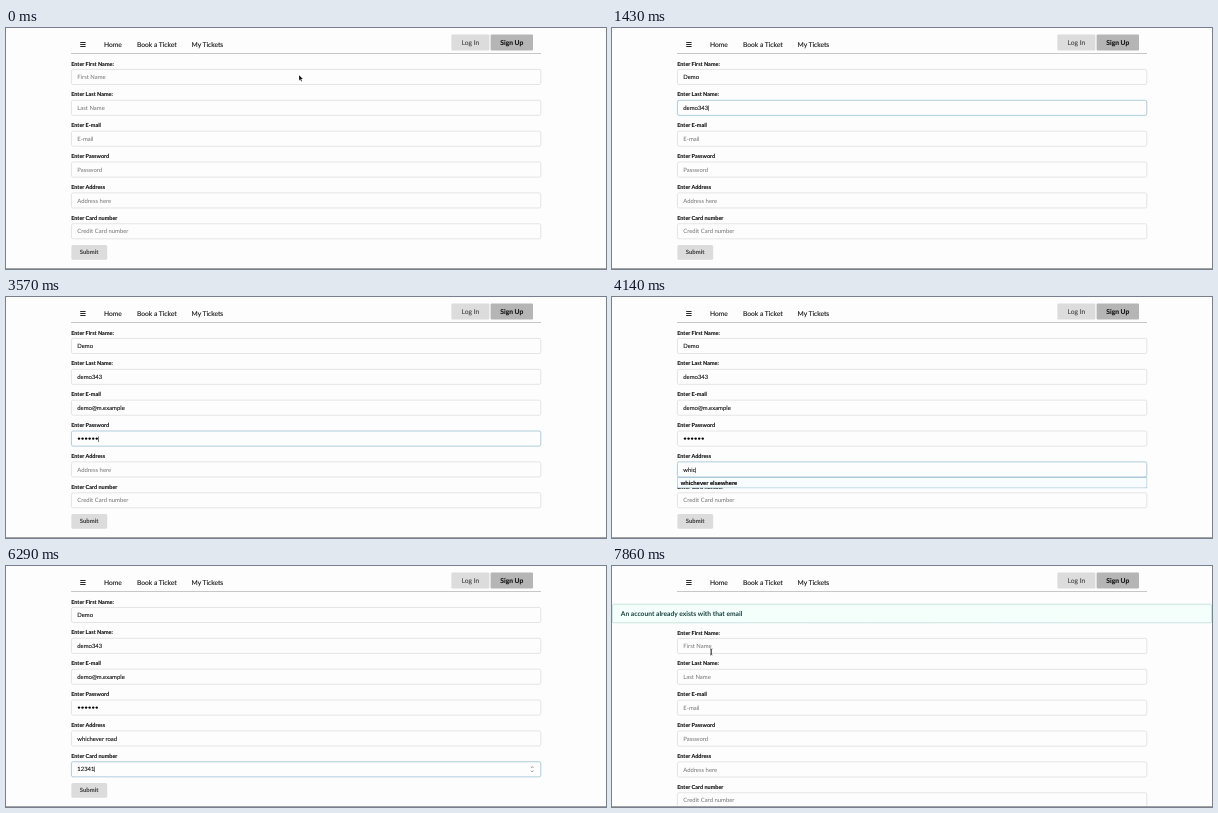
Animation, 600 px wide and 241 px high, one loop 8 s. Source, as an HTML page:

```html
<!DOCTYPE html>
<html lang="en">
<head>
<meta charset="utf-8">
<title>Sign-up form</title>
<style>
  html, body { margin: 0; height: 100%; overflow: hidden; background: #fdfdfd; }
  svg { display: block; width: 600px; height: 241px; }
  text { font: 5.92px Lato, sans-serif; fill: #111; stroke: #111; stroke-width: .1px; text-rendering: geometricPrecision; white-space: pre; }
  .nav { font-size: 6.7px; }
  .label { font-size: 5.5px; font-weight: 700; }
  .bold { font-weight: 700; }
  .hint { fill: #737373; stroke: none; }
  .muted { fill: #444; stroke: #444; }
  .option { font: 700 5.65px "Liberation Sans", sans-serif; fill: #000; }
  .banner { font-size: 6.69px; font-weight: 700; fill: #17403f; stroke: none; }
  .box { fill: #fdfdfd; stroke: #dadada; stroke-width: .7; }
  .focus { stroke: #8fb9cf; }
</style>
</head>
<body>
<svg id="stage" viewBox="0 0 600 241"></svg>
<script>
const LOOP = 8000, TICK = 1000 / 7;
const BLUR = 51, BLANK = 52, RELOADED = 53, MOVED = 55;

// keys: number of typed characters at each tick, counted from start
const fields = [
  { label: 'Enter First Name:', hint: 'First Name', start: 1, value: 'Demo',
    keys: [0, 1, 2, 3, 4], options: ['Demo'] },
  { label: 'Enter Last Name:', hint: 'Last Name', start: 6, value: 'demo343',
    keys: [0, 2, 4, 6, 7], options: ['demo'] },
  { label: 'Enter E-mail', hint: 'E-mail', start: 11, value: 'demo@m.example',
    keys: [0, 1, 2, 4, 4, 5, 7, 12, 14], options: ['demo@m.example', 'demo343@m.example'] },
  { label: 'Enter Password', hint: 'Password', start: 20, secret: true, value: '......',
    keys: [0, 1, 2, 3, 5, 6], options: [] },
  { label: 'Enter Address', hint: 'Address here', start: 27, value: 'whichever road 358',
    keys: [0, 2, 4, 8, 13, 13, 14, 16, 17, 18, 17, 18, 16, 14], options: ['whichever elsewhere'] },
  { label: 'Enter Card number', hint: 'Credit Card number', start: 41, numeric: true, value: '123412341234',
    keys: [0, 1, 3, 5, 7, 9, 11, 12], options: [] }
];

const text = (x, y, str, cls = '', extra = '') => `<text x="${x}" y="${y}" class="${cls}" ${extra}>${str}</text>`;
const rect = (x, y, w, h, fill, rx = 0) => `<rect x="${x}" y="${y}" width="${w}" height="${h}" rx="${rx}" fill="${fill}"/>`;
const box = (y, h, focus, rx) => `<rect x="65.4" y="${y}" width="469.4" height="${h}" rx="${rx}" class="box ${focus ? 'focus' : ''}"/>`;
const centered = 'text-anchor="middle"';

function header() {
  const bars = [14, 16, 18].map(y => rect(74.2, y, 5.4, .9, '#111')).join('');
  return bars + text(98, 18.7, 'Home', 'nav') + text(131, 18.7, 'Book a Ticket', 'nav') +
    text(185.6, 18.7, 'My Tickets', 'nav') +
    rect(445.4, 6.6, 38, 16, '#dcdcdc', 1) + text(464.4, 17.1, 'Log In', 'nav muted', centered) +
    rect(484.6, 6.6, 42.4, 16, '#b5b5b5', 1) + text(505.8, 17.1, 'Sign Up', 'nav bold', centered) +
    rect(65, 25, 470, .8, '#bbb');
}

function field(f, i, tick, shift) {
  const y = 41.4 + i * 30.87 + shift;
  const next = fields[i + 1];
  const focus = tick >= f.start && tick < (next ? next.start : BLUR);
  const started = tick >= f.start && tick < RELOADED;
  const typed = started ? f.value.slice(0, f.keys[Math.min(tick - f.start, f.keys.length - 1)]) : '';
  const caret = focus ? '<tspan dx="-.6">|</tspan>' : '';
  let out = text(65.2, y - 3.8, f.label, 'label') + box(y, 15.1, focus, 1.7);

  if (!typed) out += text(71.3, y + 9.7, f.hint, 'hint');
  if (f.secret) {
    for (let n = 0; n < typed.length; n++) out += `<circle cx="${73 + n * 3.55}" cy="${y + 7.6}" r="1.2"/>`;
    out += text(71.3 + typed.length * 3.55, y + 9.7, caret);
  } else {
    out += text(71.3, y + 9.7, typed + caret);
  }
  if (f.numeric && focus) {
    out += `<path d="M525 ${y + 6.2}l1.2-1.5 1.2 1.5M525 ${y + 8.8}l1.2 1.5 1.2-1.5" fill="none" stroke="#777" stroke-width=".7"/>`;
  }
  return { out, menu: focus && typed ? menu(f.options.filter(o => o.startsWith(typed)), y + 15.4) : '' };
}

function menu(options, y) {
  if (!options.length) return '';
  return box(y + .4, options.length * 10.1, true, 0) + rect(65.8, y + .8, 468.6, 9.3, '#f8fcfe') +
    options.map((o, i) => text(68.8, y + 8 + i * 10.1, o, 'option')).join('');
}

const arrow = (x, y) =>
  `<path d="M${x} ${y}v5.6l1.3-1.2.9 2 .9-.4-.9-2h1.8z" fill="#000" stroke="#fff" stroke-width=".3"/>`;
const beam = (x, y) =>
  `<path d="M${x - 1.2} ${y - 3}q1.2 0 1.2 .8v4.6q0 .8-1.2 .8M${x + 1.2} ${y - 3}q-1.2 0-1.2 .8v4.6q0 .8 1.2 .8" fill="none" stroke="#111" stroke-width=".6"/>`;

function pointer(tick) {
  if (tick === 0) return arrow(293, 47);
  if (tick < 49) return '';
  if (tick === 49) return arrow(150, 180);
  return tick < MOVED ? arrow(83, 217) : beam(99.2, 85.8);
}

function scene(tick) {
  const edge = rect(0, 240, 600, 1, '#fdfdfd') + rect(0, 240, 600, .8, '#8c8c8c');
  if (tick === BLANK) return edge;
  const reloaded = tick >= RELOADED;
  const shift = reloaded ? 31 : 0;
  const parts = fields.map((f, i) => field(f, i, tick, shift));
  const banner = reloaded
    ? '<rect x=".3" y="38.2" width="599.4" height="18.6" rx="1.5" fill="#f4fffc" stroke="#a5d3cb" stroke-width=".6"/>' +
      text(8.8, 49.8, 'An account already exists with that email', 'banner')
    : '';
  return header() + banner + parts.map(p => p.out).join('') +
    rect(65.4, 217 + shift, 35.8, 14.8, tick === BLUR ? '#cacbcd' : '#dcdcdc', 1.6) +
    text(83.1, 226.3 + shift, 'Submit', 'bold muted', centered) +
    parts.map(p => p.menu).join('') + edge + pointer(tick);
}

const stage = document.getElementById('stage');
let shown = -1;
function draw() {
  // the small lead keeps rounded-down times on their own tick
  const tick = Math.floor((performance.now() % LOOP + 5) / TICK) % 56;
  if (tick !== shown) stage.innerHTML = scene(shown = tick);
  requestAnimationFrame(draw);
}
draw();
</script>
</body>
</html>
```
